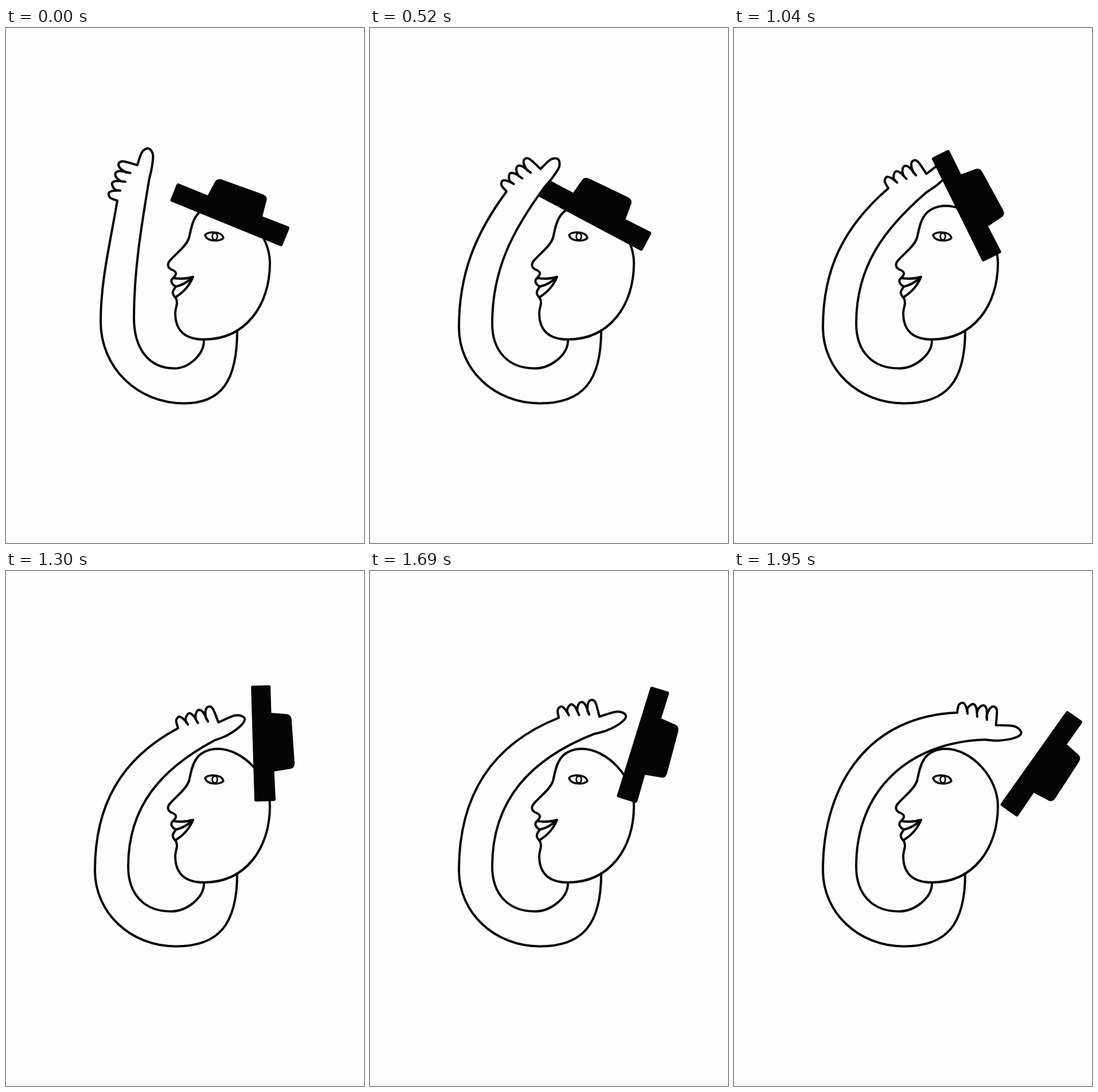
An HTML page with a canvas that plays this animation: 624x898 px, repeating every 2.08 s.

```html
<!DOCTYPE html>
<html>
<head>
<meta charset="utf-8">
<style>
html, body { margin: 0; width: 100%; height: 100%; overflow: hidden; background: #fdfdfd; }
canvas { display: block; }
</style>
</head>
<body>
<canvas id="stage" width="624" height="898"></canvas>
<script>
const ctx = document.getElementById('stage').getContext('2d');
const PAPER = '#fdfdfd', INK = '#050505';
const STEP = 130, STEPS = 16, DEG = Math.PI / 180;

// Key poses: step, x, y, angle
const WRIST = [
  [0, 194, 301, -60.6], [4, 238, 285, -33.5], [6, 238, 285, -33.5],
  [10, 300, 274, -8.1], [13, 329, 256, -1.6], [15, 389, 247, 17.9]
];
const BRIM = [
  [3, 480, 381, 22.2], [4, 473, 389, 28], [8, 433, 407, 63.7],
  [10, 433, 401, 88.3], [13, 430, 393, 107.2], [15, 464, 407, 125.4]
];

const head = new Path2D(`M291 436 C300 428 296 424 288 421 C281 417 280 411 288 403
  C300 390 314 380 319 366 C324 345 326 312 368 310 C414 310 460 360 460 410
  C460 483 418 543 345 543 C315 543 295 530 295 497 C295 487 301 480 296 471
  C288 463 290 459 296 451 C288 446 286 441 291 436
  Q310 439 326 434 Q313 447 296 451 M326 434 Q317 456 296 469`);
const eye = new Path2D('M347 361 C352 354 376 354 379 366 C374 373 350 373 347 361Z');
const iris = new Path2D();
iris.ellipse(364, 363.5, 4.5, 6, 0, 0, 7);

const clamp = v => Math.max(0, Math.min(1, v));

function pose(keys, step) {
  const next = keys.findIndex(k => k[0] >= step);
  const b = keys[next], a = keys[Math.max(0, next - 1)];
  const p = a === b ? 0 : (step - a[0]) / (b[0] - a[0]);
  return a.map((v, i) => v + (b[i] - v) * p).slice(1);
}

// Smooth curve through all points
function curve(path, p) {
  path.lineTo(...p[0]);
  for (let i = 0; i < p.length - 1; i++) {
    const a = p[i - 1] || p[i], b = p[i], c = p[i + 1], d = p[i + 2] || c;
    path.bezierCurveTo(
      b[0] + (c[0] - a[0]) / 6, b[1] + (c[1] - a[1]) / 6,
      c[0] - (d[0] - b[0]) / 6, c[1] - (d[1] - b[1]) / 6, ...c);
  }
}

// Quarter turn between a vertical and a horizontal tangent
function quarter(path, [x0, y0], [x1, y1], k, startsVertical) {
  const dx = (x1 - x0) * k, dy = (y1 - y0) * k;
  if (startsVertical) path.bezierCurveTo(x0, y0 + dy, x1 - dx, y1, x1, y1);
  else path.bezierCurveTo(x0 + dx, y0, x1, y1 - dy, x1, y1);
}

// Side of the forearm: leaves the elbow upwards and arrives along the hand
function forearm(elbow, end, aim) {
  const bow = 0.33 + 0.06 * (aim + Math.PI / 2);
  const reach = Math.hypot(end[0] - elbow[0], end[1] - elbow[1]) * bow;
  return [
    elbow, [elbow[0], elbow[1] - reach],
    [end[0] - reach * Math.cos(aim), end[1] - reach * Math.sin(aim)], end
  ];
}

function drawArm(step) {
  const [x, y, angle] = pose(WRIST, step);
  const c = Math.cos(angle * DEG), s = Math.sin(angle * DEG);
  const place = ([u, v]) => [x + u * c - v * s, y + u * s + v * c];
  const aim = (angle - 20) * DEG;
  const lean = clamp(step / 4), stretch = clamp((step - 6) / 2);

  const outer = [165 - 10 * lean, 512 + 10 * lean];
  const inner = [223 - 10 * lean, 505 + 10 * lean];
  const outerLow = [310 - 14 * lean, 654.5], innerLow = [293 - 6 * lean, 593.5];
  const palm = place([60, 30]);

  const outline = new Path2D();
  outline.moveTo(403, 527);
  quarter(outline, [403, 527], outerLow, 0.7, true);
  quarter(outline, outerLow, outer, 0.56, false);
  outline.bezierCurveTo(...forearm(outer, [x, y], aim).slice(1).flat());

  for (let i = 0; i < 4; i++) {
    const left = 17.75 * i, top = -19.5 - 3.4 * i;
    curve(outline, [
      i ? [left - 3, -11] : [0, 0], [left - 1.5, top + 6], [left + 4.5, top],
      [left + 11.5, top + 5], [left + 17.75, i < 3 ? -4 : 0]
    ].map(place));
  }
  curve(outline, [
    [71, 0], [95 + 7 * stretch, -4 - 4 * stretch], [106 + 11 * stretch, 3 - 4 * stretch],
    [100 + 9 * stretch, 15 - 4 * stretch], [80 + 4 * stretch, 24], [60, 30]
  ].map(place));
  outline.bezierCurveTo(...forearm(inner, palm, aim).reverse().slice(1).flat());
  quarter(outline, inner, innerLow, 0.62, true);
  quarter(outline, innerLow, [345, 545], 0.5, false);

  // The fill passes below the chin
  const body = new Path2D(outline);
  body.lineTo(390, 562);
  ctx.fillStyle = PAPER;
  ctx.fill(body);
  ctx.lineWidth = 4;
  ctx.stroke(outline);
}

function drawHead() {
  ctx.lineWidth = 4;
  ctx.stroke(head);
  ctx.lineWidth = 3.4;
  ctx.stroke(eye);
  ctx.lineWidth = 2.8;
  ctx.stroke(iris);
}

function drawHat(step, brim) {
  const [x, y, angle] = pose(BRIM, step);
  ctx.save();
  ctx.translate(x, y);
  ctx.rotate(angle * DEG);
  const hat = new Path2D(`M-2-3 H${-brim} V-31 H-150 L-147-58 Q-147-66-138-66
    L-64-69 Q-57-69-57-62 L-53-33 L-2-34Z`);
  ctx.fillStyle = INK;
  ctx.lineWidth = 6;
  ctx.fill(hat);
  ctx.stroke(hat);
  ctx.restore();
}

function draw(now) {
  const step = Math.floor(now / STEP) % STEPS;
  const handInFront = step < 6;
  ctx.fillStyle = PAPER;
  ctx.fillRect(0, 0, 624, 898);
  ctx.strokeStyle = INK;
  ctx.lineJoin = ctx.lineCap = 'round';
  if (!handInFront) drawArm(step);
  drawHead();
  drawHat(step, handInFront ? 207 : 198);
  if (handInFront) drawArm(step);
  requestAnimationFrame(draw);
}
draw(performance.now());
</script>
</body>
</html>
```
